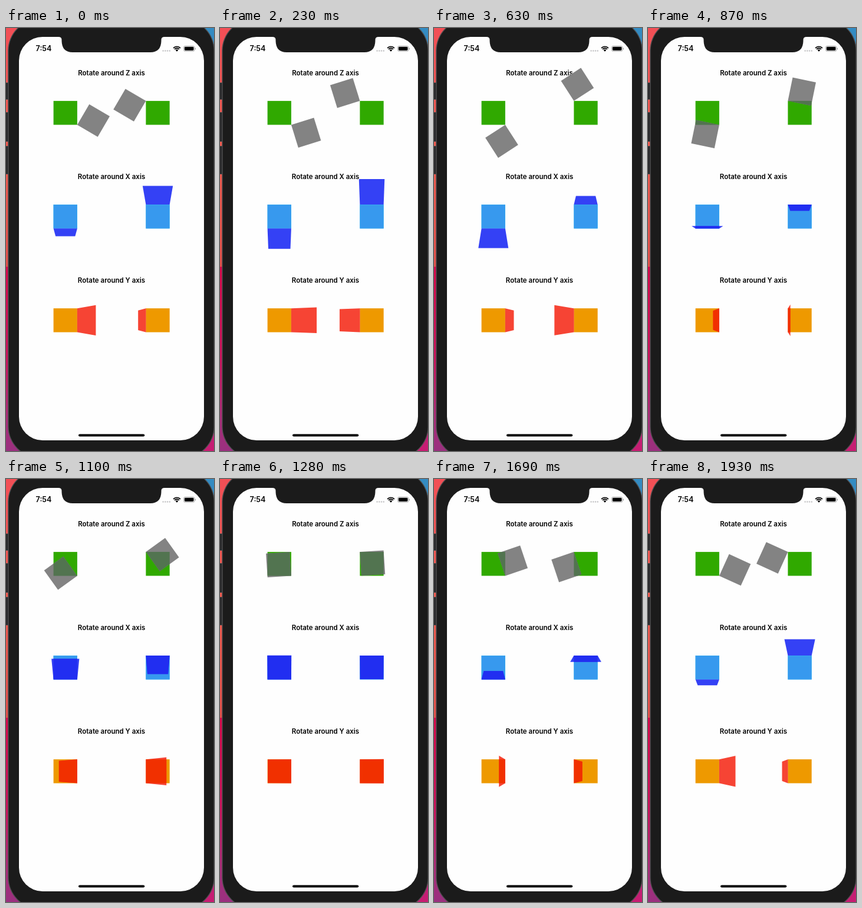
Animation of 353x714 px, one loop 2030 ms. Source, as an HTML page with a canvas:

```html
<!DOCTYPE html>
<html lang="en">
<head>
<meta charset="utf-8">
<title>Rotation axes</title>
<style>
  html, body { margin: 0; width: 100%; height: 100%; overflow: hidden; background: #1b1b1b; }
  canvas { display: block; width: 353px; height: 714px; }
</style>
</head>
<body>
<canvas id="stage" width="353" height="714"></canvas>
<script>
const ctx = document.getElementById('stage').getContext('2d');
const LOOP = 2030;
const SIZE = 40.3;
const LEFT = 80.6, RIGHT = 237.4;
const ROWS = { z: 123.1, x: 298.1, y: 473.2 };
const DEPTH = 0.25;

// Step durations: mostly 60 ms, a few short ones, a longer hold at the end.
const SHORT = [0, 4, 10, 17, 25];
const LAST = 33;
// Step index and rotation in degrees.
const KEYS = [[0, 120.4], [4, 162.7], [11, 237.1], [15, 281.6], [19, 324.2], [26, 398.9], [33, 474.5]];

const COLORS = {
  z: { base: '#30a900', panel: '#838383', over: '#527450' },
  x: { base: '#3799ee', panel: '#3441f5', over: '#212ef1', edge: '#34a8f1' },
  y: { base: '#ee9900', panel: '#f64434', over: '#f13000' }
};

function stepAt(ms) {
  let end = 0;
  for (let i = 0; i < LAST; i++) {
    end += SHORT.includes(i) ? 50 : 60;
    if (ms < end) return i;
  }
  return LAST;
}

function angleAt(step) {
  let k = 1;
  while (step > KEYS[k][0]) k++;
  const [s0, a0] = KEYS[k - 1], [s1, a1] = KEYS[k];
  return (a0 + (a1 - a0) * (step - s0) / (s1 - s0)) * Math.PI / 180;
}

function box(x, y, w, h, r, color) {
  ctx.fillStyle = color;
  ctx.beginPath();
  ctx.roundRect(x, y, w, h, r);
  ctx.fill();
}

function label(text, x, y, size, align) {
  ctx.font = `600 ${size}px Inter, "Open Sans", sans-serif`;
  ctx.textAlign = align;
  ctx.fillStyle = '#000';
  ctx.fillText(text, x, y);
}

function gradient(y0, y1, stops) {
  const g = ctx.createLinearGradient(0, y0, 0, y1);
  stops.forEach(([at, color]) => g.addColorStop(at, color));
  return g;
}

function drawWallpaper() {
  ctx.fillStyle = gradient(0, 403, [[0, '#f24f56'], [0.5, '#ee5c50'], [1, '#e2504a']]);
  ctx.fillRect(0, 0, 176, 403);
  ctx.fillStyle = gradient(403, 714, [[0, '#d6084a'], [0.5, '#c9145c'], [0.82, '#a82d78'], [1, '#9a307f']]);
  ctx.fillRect(0, 403, 176, 311);
  ctx.fillStyle = gradient(0, 714, [[0, '#338cc3'], [0.5, '#5a62a0'], [1, '#c81c72']]);
  ctx.fillRect(176, 0, 177, 714);
}

function drawPhone() {
  [[92, 29], [142, 50], [199, 48]].forEach(([y, h]) => {
    box(-4, y, 9, h, 1, '#4a4a4c');
    box(-4, y + 1, 8, h - 2, 1, '#29292b');
  });
  box(3.2, -14.8, 350.8, 740.6, 53, '#505052');
  box(4.6, -13.4, 348, 737.8, 51.5, '#1b1b1b');
  box(22, 15, 314, 681, 40, '#fefefe');

  // Notch with rounded shoulders
  ctx.fillStyle = '#1b1b1b';
  ctx.beginPath();
  ctx.moveTo(89, 14);
  ctx.lineTo(89, 15);
  ctx.quadraticCurveTo(94.5, 15, 94.5, 20);
  ctx.lineTo(94.5, 22);
  ctx.quadraticCurveTo(95, 41, 113, 41);
  ctx.lineTo(245, 41);
  ctx.quadraticCurveTo(263, 41, 263.5, 22);
  ctx.lineTo(263.5, 20);
  ctx.quadraticCurveTo(263.5, 15, 269, 15);
  ctx.lineTo(269, 14);
  ctx.fill();
  box(123, 685.4, 112.3, 4.2, 2.1, '#000');
}

function drawStatus() {
  label('7:54', 50.6, 39.4, 12.5, 'left');
  for (let i = 0; i < 4; i++) box(265.4 + i * 3.7, 37.2, 2.5, 2.5, 1.25, '#c4c4c6');

  const cx = 290, cy = 39.8, a = Math.PI / 4;
  ctx.strokeStyle = ctx.fillStyle = '#000';
  ctx.lineWidth = 1.9;
  [5.5, 8.4].forEach(r => {
    ctx.beginPath();
    ctx.arc(cx, cy, r, -Math.PI / 2 - a, -Math.PI / 2 + a);
    ctx.stroke();
  });
  ctx.beginPath();
  ctx.moveTo(cx, cy);
  ctx.arc(cx, cy, 3.3, -Math.PI / 2 - a, -Math.PI / 2 + a);
  ctx.fill();

  ctx.strokeStyle = '#a2a2a2';
  ctx.lineWidth = 0.9;
  ctx.beginPath();
  ctx.roundRect(301.5, 30.4, 18.4, 9, 2.6);
  ctx.stroke();
  box(302.9, 31.8, 15.6, 6.2, 1.4, '#000');
  box(320.8, 33.4, 1.2, 3, 0.6, '#a2a2a2');
}

function trace(points) {
  ctx.beginPath();
  points.forEach(([x, y]) => ctx.lineTo(x, y));
  ctx.closePath();
}

// Corners of the turned square around the middle of its base.
// side is 1 when the hinge lies right/bottom, -1 when left/top.
function panelShape(axis, side, angle) {
  const h = SIZE / 2, cos = Math.cos(angle), sin = Math.sin(angle);
  const hinge = side * h;
  if (axis === 'z') {
    const d = -side * SIZE;
    return [[0, 0], [d, 0], [d, d], [0, d]].map(([x, y]) =>
      [hinge + x * cos - y * sin, hinge + x * sin + y * cos]);
  }
  const toward = axis === 'x' ? side : -side;
  const scale = 1 / (1 + toward * DEPTH * sin);
  const far = (hinge - side * SIZE * cos) * scale;
  const half = h * scale;
  const shape = [[hinge, -h], [hinge, h], [far, half], [far, -half]];
  return axis === 'y' ? shape : shape.map(([u, v]) => [v, u]);
}

function drawPair(axis, side, angle) {
  const x = side > 0 ? LEFT : RIGHT, y = ROWS[axis], c = COLORS[axis];
  const points = panelShape(axis, side, angle)
    .map(([px, py]) => [x + SIZE / 2 + px, y + SIZE / 2 + py]);

  ctx.fillStyle = c.base;
  ctx.fillRect(x, y, SIZE, SIZE);
  if (c.edge) {
    ctx.strokeStyle = c.edge;
    ctx.lineWidth = 0.8;
    ctx.strokeRect(x + 0.4, y + 0.4, SIZE - 0.8, SIZE - 0.8);
  }
  ctx.fillStyle = c.panel;
  trace(points);
  ctx.fill();

  // Where the panel crosses its base the colours blend.
  ctx.save();
  ctx.beginPath();
  ctx.rect(x, y, SIZE, SIZE);
  ctx.clip();
  ctx.fillStyle = c.over;
  trace(points);
  ctx.fill();
  ctx.restore();
}

function render(ms) {
  const angle = angleAt(stepAt(ms % LOOP));
  drawWallpaper();
  drawPhone();
  drawStatus();
  for (const axis of ['z', 'x', 'y']) {
    label(`Rotate around ${axis.toUpperCase()} axis`, 179, ROWS[axis] - 43, 11.5, 'center');
    drawPair(axis, 1, angle);
    drawPair(axis, -1, angle);
  }
}

function tick() {
  render(performance.now());
  requestAnimationFrame(tick);
}
tick();
</script>
</body>
</html>
```
